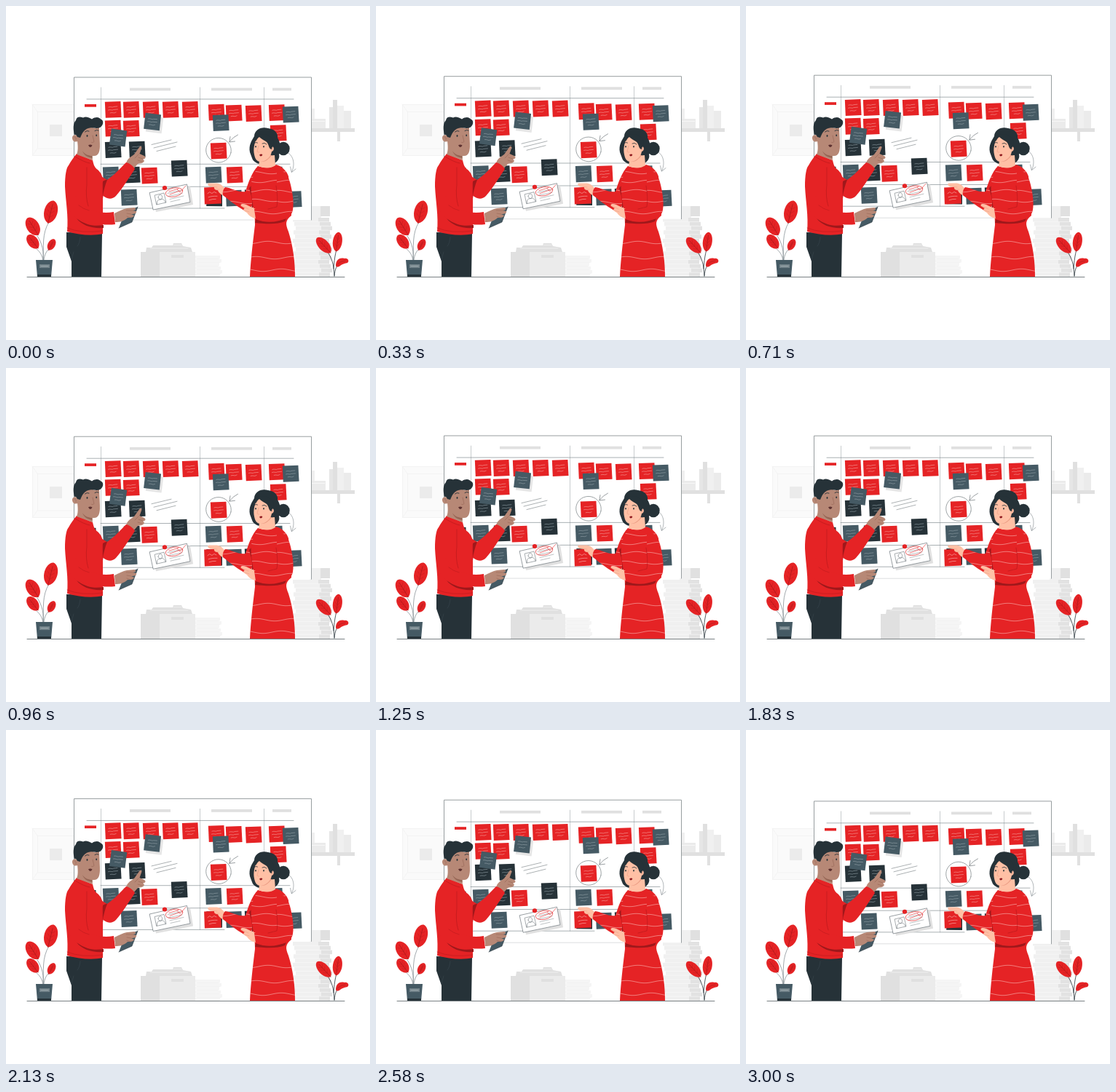
These frames come from a looping animation (500 by 459 pixels, 3040 ms). An HTML page with a canvas:

```html
<!DOCTYPE html>
<html lang="en">
<head>
<meta charset="utf-8">
<title>Planning board</title>
<style>
html, body { margin: 0; width: 100%; height: 100%; overflow: hidden; background: #fff; }
canvas { display: block; width: 500px; height: 459px; }
</style>
</head>
<body>
<canvas id="stage"></canvas>
<script>
const W = 500, H = 459, LOOP = 3040, LIFT = 6;
const RED = '#e52325', DEEP = '#9f181b', SLATE = '#455a64', DARK = '#263238';
const SKIN = '#b78876', SHADE = '#956655', PEACH = '#ffc0a5', BLUSH = '#e99a82';

const canvas = document.getElementById('stage');
const dpr = window.devicePixelRatio || 1;
canvas.width = W * dpr;
canvas.height = H * dpr;
const c = canvas.getContext('2d');
c.lineCap = c.lineJoin = 'round';

function rect(x, y, w, h, color) {
  c.fillStyle = color;
  c.fillRect(x, y, w, h);
}
function fill(d, color) {
  c.fillStyle = color;
  c.fill(new Path2D(d));
}
function line(d, color, width = 0.7) {
  c.strokeStyle = color;
  c.lineWidth = width;
  c.stroke(new Path2D(d));
}
function oval(x, y, rx, ry, color) {
  c.beginPath();
  c.ellipse(x, y, rx, ry, 0, 0, 7);
  c.fillStyle = color;
  c.fill();
}
function ring(x, y, rx, ry, turn, color) {
  c.beginPath();
  c.ellipse(x, y, rx, ry, turn, 0, 7);
  c.strokeStyle = color;
  c.lineWidth = 0.7;
  c.stroke();
}
function at(x, y, deg, draw) {
  c.save();
  c.translate(x, y);
  c.rotate(deg * Math.PI / 180);
  draw();
  c.restore();
}

// ---------- room ----------
function room() {
  rect(36, 135, 75, 71, '#fafafa');
  line('M36.5 135.5H110M36.5 135.5V205.5H110M43 145.5H110M43.5 145V196H110M36 135L43 145M36 206L43 196', '#f1f1f1', 0.8);
  rect(60, 163, 17, 16, '#ebebeb');

  rect(415, 168, 64, 5, '#e0e0e0');
  rect(455, 173, 4, 13, '#e0e0e0');
  rect(415, 141, 9, 27, '#f0f0f0');
  rect(420, 155, 19, 13, '#ebebeb');
  rect(420, 158, 18, 1, '#f7f7f7');
  rect(444, 139, 5, 29, '#e6e6e6');
  rect(449, 129, 6, 39, '#e0e0e0');
  rect(455, 137, 9, 31, '#f0f0f0');
  rect(464, 144, 10, 24, '#ebebeb');

  fill('M192 338L193 332L200 332L202 329L229 329L230 326L241 326L243 330L254 332L256 338Z', '#e0e0e0');
  line('M198 333H250M230 328.5H241', '#f0f0f0', 0.8);
  rect(185, 338, 26, 34, '#e0e0e0');
  rect(211, 338, 49, 34, '#ebebeb');
  rect(227, 342, 17, 4, '#e0e0e0');
  for (let i = 0; i < 6; i++) {
    const w = [34, 36, 33, 35, 37, 34][i];
    rect(260, 343 + i * 5, w, 4.4, '#f5f5f5');
    line(`M262 ${347.6 + i * 5}H${258 + w}`, '#ebebeb', 0.6);
  }

  rect(417, 275, 16, 17, '#f0f0f0');
  rect(432, 275, 13, 14, '#e0e0e0');
  for (let i = 0; i < 14; i++) {
    const y = 291 + i * 5.8, dx = i * 7 % 5;
    rect(394 + dx, y, 37, 5.5, '#f0f0f0');
    rect(429 + dx, y, 15, 5.5, '#e2e2e2');
    line(`M396 ${y + 5.5}H442`, '#f7f7f7', 0.6);
  }
}

// ---------- board ----------
function note(x, y, color, deg = -2) {
  at(x, y, deg, () => {
    fill('M-10.8 -11H10.8L11.2 11L-10.6 11.2Z', color);
    const ink = color === RED ? '#f5a09c' : '#93a1a8';
    for (let i = 0; i < 3; i++) {
      const l = [6, 6.5, 4][i], v = i * 4 - 3.5;
      line(`M${-l} ${v}q2 -.6 4 0t3 -.3L${l} ${v - 0.6}`, ink, 0.6);
    }
  });
}
function notes(list, color) {
  list.forEach(([x, y, turn]) => note(x, y, color, turn));
}

function card() {
  fill('M201 260L253 248L257 273L206 283Z', '#e0e0e0');
  const d = 'M197.5 256.5L248.5 245L253 269.5L202.5 280Z';
  fill(d, '#fff');
  line(d, '#6c757a');
  line('M204.5 260L217 257L220 270L207 273Z', '#6c757a', 0.6);
  line('M207.5 272.5C207 267 209 266 212 266C216 264 218 267 219 270M209 263C209 259 214 258 214.5 262C215 267 210 267 209 263', '#6c757a', 0.6);
  line('M222 257.5L241 253M223 261.5L242 257.5M225 265.5L244 261M226 269L239 266', '#90979a', 0.6);
  ring(231, 256, 12, 6, -0.2, RED);
  line('M224 255L237 251M225 259L239 254M235 252L239 256L247 247', RED, 0.6);
  oval(218, 250, 3.2, 3, RED);
}

function board(lift) {
  c.save();
  c.translate(0, -lift);
  rect(93.5, 98, 326, 196, '#fff');
  line('M130 294H340', '#d3d6d7', 0.8);
  line('M93.5 294V98H419.5V294', '#8d9396', 0.9);
  line('M130.5 112V278M266.5 112V278M354.5 112V278', '#b0b6b9', 0.7);
  line('M111 128H395M130 217.3H390M130 248.3H385M130 278H300', '#858e92', 0.7);
  [[170, 56], [282, 56], [366, 26]].forEach(([x, w]) => rect(x, 112.6, w, 3.8, '#e0e0e0'));
  rect(108, 135, 16, 3.7, RED);

  notes([[147, 142.3], [172, 142.3], [199, 142.3], [226, 142.3], [253, 142.3], [289, 146],
    [313, 147], [340, 147.5], [372, 146.5], [147, 168], [172, 168.3], [374, 174.5]], RED);
  notes([[113, 235], [147, 197.5], [180, 197], [238, 223], [173, 232], [339, 263], [286, 264, 1]], DARK);
  notes([[144, 232], [169, 263], [285, 232], [369, 232], [313, 264], [395, 265.5]], SLATE);
  notes([[197, 233], [314, 232], [292, 199]], RED);

  at(204, 163, 7, () => rect(-11, -11, 22, 22, '#e6e6e6'));
  notes([[201, 159, 7], [295, 160.5], [391, 149], [154, 181, 8]], SLATE);

  line('M200 190.5L227 184M203 195L235 187M207 199.5L233 193', '#737b7f', 0.6);
  ring(292, 198.2, 17.3, 16.8, 0.2, '#737b7f');
  line('M318.5 177Q312 180 307 186.5M308 179.5L306.8 187L314.5 186', '#565f64', 0.6);
  line('M386 201C396 206 397 219 392.5 228M390.5 221L392.3 228.5L398 224', '#7b8488', 0.6);
  card();
  c.restore();
}

function heldNote() {
  at(284, 260.5, -2, () => {
    rect(-11.5, -11.5, 23, 23, RED);
    line('M-7 -3L-4 -5L-1 -3L2 -5L5 -3.5M-6 2Q-2 0.5 6 1M-5 6Q0 4.5 4 5', '#f9b5b0', 0.6);
  });
}

// ---------- plants ----------
function leaf(x, y, rx, ry, deg) {
  at(x, y, deg, () => {
    fill(`M0 ${ry}C${-rx * 1.5} ${ry * 0.65} ${-rx * 1.2} ${-ry * 0.9} 0 ${-ry}C${rx * 1.2} ${-ry * 0.9} ${rx * 1.5} ${ry * 0.65} 0 ${ry}Z`, RED);
    line(`M0 ${ry}V${-ry * 0.65}`, DEEP, 0.6);
    for (let i = -1; i < 2; i++) {
      const v = i * ry * 0.35;
      line(`M${-rx * 0.5} ${v - 2}L0 ${v + 2}L${rx * 0.5} ${v - 2}`, '#bd191c', 0.4);
    }
  });
}
function plants() {
  line('M51 350C52 330 49 313 59 297M51 350C53 332 46 320 41 313M51 349C49 341 46 337 41 333M52 349C53 342 55 337 60 333', '#7a858a');
  leaf(61.5, 283, 9, 16, 14);
  leaf(37, 303, 8.5, 14, -32);
  leaf(37, 324, 7, 11.5, -38);
  leaf(62.5, 328, 5, 8.5, 28);
  fill('M41 349H64L62 372H43Z', SLATE);
  rect(43, 369, 19, 3, DARK);
  rect(46, 355, 14, 5, '#74848b');
  line('M48 357.5H58', '#b2bdc1');

  line('M451 371C450 354 448 347 441 337M450 361C451 349 452 342 454 335M451 371C452 361 454 357 458 353', DARK, 0.8);
  leaf(436.5, 329, 7, 14, -43);
  leaf(455.3, 324, 6.3, 13.5, 8);
  fill('M453 357C453 350 457 345 465 347C470 346 472 351 469 353C464 354 461 355 459 357C456 359 454 359 453 357Z', RED);
  line('M455 355Q460 350 466 350', DEEP, 0.5);
}

// ---------- people ----------
function man() {
  fill('M83 311L132 312L131 372H90V351L83 331Z', DARK);
  line('M90 348L93 338M98 330Q101 327 102 318', '#3a474e', 0.6);

  // pointing arm
  fill('M165 216C167 209 172 207 176 204L183.5 193.5C185 191.5 187.5 194 186 196L183.5 203L190 206C193 208 191 211 188 210L190 213C188 217 183 216 181 217L175 224Z', SKIN);
  line('M182 204L177 209M188 210L182 208M187 214L181 212', SHADE, 0.6);
  fill('M122 229L139 239C148 233 157 223 165 215C170 216 175 220 177 224C169 236 160 251 151 261C143 269 134 262 130 258Z', RED);

  fill('M97 203L119 212C120 216 121 222 126 225C136 234 133 246 133 259L133 313C120 316 101 315 84 310C86 288 82 269 81 248C81 232 83 222 86 219C89 213 93 208 97 203Z', RED);
  fill('M133 241Q138 238 139 239C136 246 135 252 133 259Z', DEEP);
  line('M115 216Q108 215 95 207M111 222V245Q109 263 113 275M133 243V263', '#b3191c', 0.6);

  // head
  fill('M99 176C103 168 112 166 119 167C123 169 127 168 128 166L129 189C129.5 200 127 206 121 206L118.5 206L119 212L97 204C99 200 99 193 98 186C93 188 91 184 91 181C91 177 96 176 99 179Z', SKIN);
  fill('M105 199C108 204 114 206 118.5 206L118.5 209C112 208 107 205 105 199Z', SHADE);
  fill('M94 177C92 169 92 161 96 157C97 152 101 151.5 106 153.5C109 151 115 153.5 118 155.5C123 152 128 152.5 130 155.5C135 157 134 164 129 167C124 169.5 119 166 113 168C107 170 105 174 102 181L98 180C97 177 95 176 94 177Z', DARK);
  line('M108.5 173Q111 170.5 114 172M122 171.5Q125 169.5 127 171', DARK, 0.9);
  oval(111.5, 178.5, 0.9, 1.4, DARK);
  oval(124.2, 177.8, 0.9, 1.4, DARK);
  line('M119 178L121 186.5Q119 188.5 117.5 187.5', SHADE, 0.6);
  fill('M113 191.3Q116 189.5 118.5 191.5Q117 195 114.5 193.5Z', '#5c3030');
  line('M94 180Q97 180 96 184', SHADE, 0.6);

  // tablet and near arm
  fill('M164 282L181 276L173 297L155 305Z', SLATE);
  line('M181 276L173 297L155 305', DARK, 0.6);
  fill('M149 285C155 282 161 279 166 278L176 277C180 278 178 281 174 281L179 282C180 285 176 286 172 286L176 288C175 291 170 291 167 291C162 296 156 297 150 297Z', SKIN);
  line('M165 281L174 281M166 285L172 286M166 289L171 291', SHADE, 0.6);
  fill('M97 292C111 302 122 303 134 301V305C118 306 105 302 97 292Z', DEEP);
  fill('M83 248C83 275 87 289 101 293C118 299 136 302 150 300L148 283C133 286 117 282 110 276Z', RED);
  line('M100 274Q106 279 114 281M84 305Q103 313 133 309', '#b3191c', 0.5);
}

function wave(x1, x2, y, phase) {
  let d = '';
  for (let x = x1; x <= x2; x += 2) d += `${d ? 'L' : 'M'}${x} ${y + 1.7 * Math.sin(x / 8 + phase)}`;
  line(d, '#f9b9b6', 0.6);
}
function patterned(d, x1, x2, rows) {
  fill(d, RED);
  c.save();
  c.clip(new Path2D(d));
  rows.forEach((y, i) => wave(x1, x2, y, i * 2));
  c.restore();
}
function woman() {
  oval(381, 196, 8.7, 9.3, DARK);
  fill('M335 201C333 191 338 184 341 179C341 170 351 165 360 168C370 169 374 176 373 181C378 190 378 198 375 204C377 210 371 217 363 218C350 219 340 216 338 209Z', DARK);

  // reaching arm
  fill('M300 250L296 246C291 242 286 244 279 243.5C276 244 277 247 280 248L286 249C285 251 289 254 291 253C292 257 296 259 299 261Z', PEACH);
  line('M280 248L290 249M287 252L293 252', BLUSH, 0.5);
  patterned('M346 220C338 228 333 242 329 255C320 257 310 250 301 249C298 252 297 257 298 260C309 269 321 278 331 283C338 278 345 260 350 250Z', 292, 350, [237, 254, 270]);
  fill('M334 250L341 243L345 270L336 281C341 270 336 258 334 250Z', DEEP);

  patterned('M346 220C354 223 366 223 371 218C379 220 386 227 388 234L392 288C383 295 384 300 388 310C394 329 397 350 397 372H335C336 351 339 325 342 301C343 281 333 256 338 238Z', 332, 400, [229, 241, 254, 267, 279, 325, 346, 363]);

  // head
  fill('M347 220L349 207L369 205L370 219C363 224 354 223 347 220Z', PEACH);
  fill('M350 214Q358 215 365 205L361 204L350 210Z', BLUSH);
  fill('M344 182C341 189 339.5 197 341 204C342 210 345 214.5 350 214C358 213 364 207 365 200C369 199 369 192 364 193C361 186 352 185 349 178Z', PEACH);
  fill('M341 184C348 173 361 174 368 186L365 197C360 196 362 190 357 186C353 184 350 182 348 180C346 181 345 183 343 186Z', DARK);
  line('M341 188.5Q343 186.5 345.5 188M352 189Q355 187 358 190', DARK, 0.8);
  oval(343, 193.3, 0.8, 1.3, DARK);
  oval(354, 193.3, 0.8, 1.3, DARK);
  line('M347 192L345 200Q346 201.5 347.5 201', BLUSH, 0.6);
  fill('M348 204.8Q350 202.8 352.3 204Q352 207 349.2 206.3Z', '#8f171d');
  line('M365 195Q368 195 365 199', BLUSH, 0.6);

  // folded arm
  fill('M343 293C360 300 374 296 385 292L383 296C372 301 354 299 342 298Z', DEEP);
  fill('M343 279C338 277 334 275 330 273C325 271 321 272 323 275L328 278C324 279 328 283 331 284C333 288 338 291 343 292Z', PEACH);
  line('M324 275L333 279M328 281L334 283', BLUSH, 0.5);
  patterned('M372 228C380 224 387 231 390 242C393 253 396 269 394 280C392 292 381 294 371 294L343 293L341 279C353 278 364 279 372 276Z', 336, 398, [241, 255, 268, 284]);
  line('M371 247Q374 264 372 276L360 279', '#b3191c', 0.6);
}

function draw(now) {
  const t = now % LOOP / LOOP;
  c.setTransform(dpr, 0, 0, dpr, 0, 0);
  rect(0, 0, W, H, '#fff');
  room();
  board(LIFT * (1 - Math.abs(1 - 2 * t)));
  heldNote();
  line('M29 372.5H465', '#596165', 0.8);
  plants();
  man();
  woman();
}
const start = performance.now();
function tick() {
  draw(performance.now() - start);
  requestAnimationFrame(tick);
}
tick();
</script>
</body>
</html>
```
